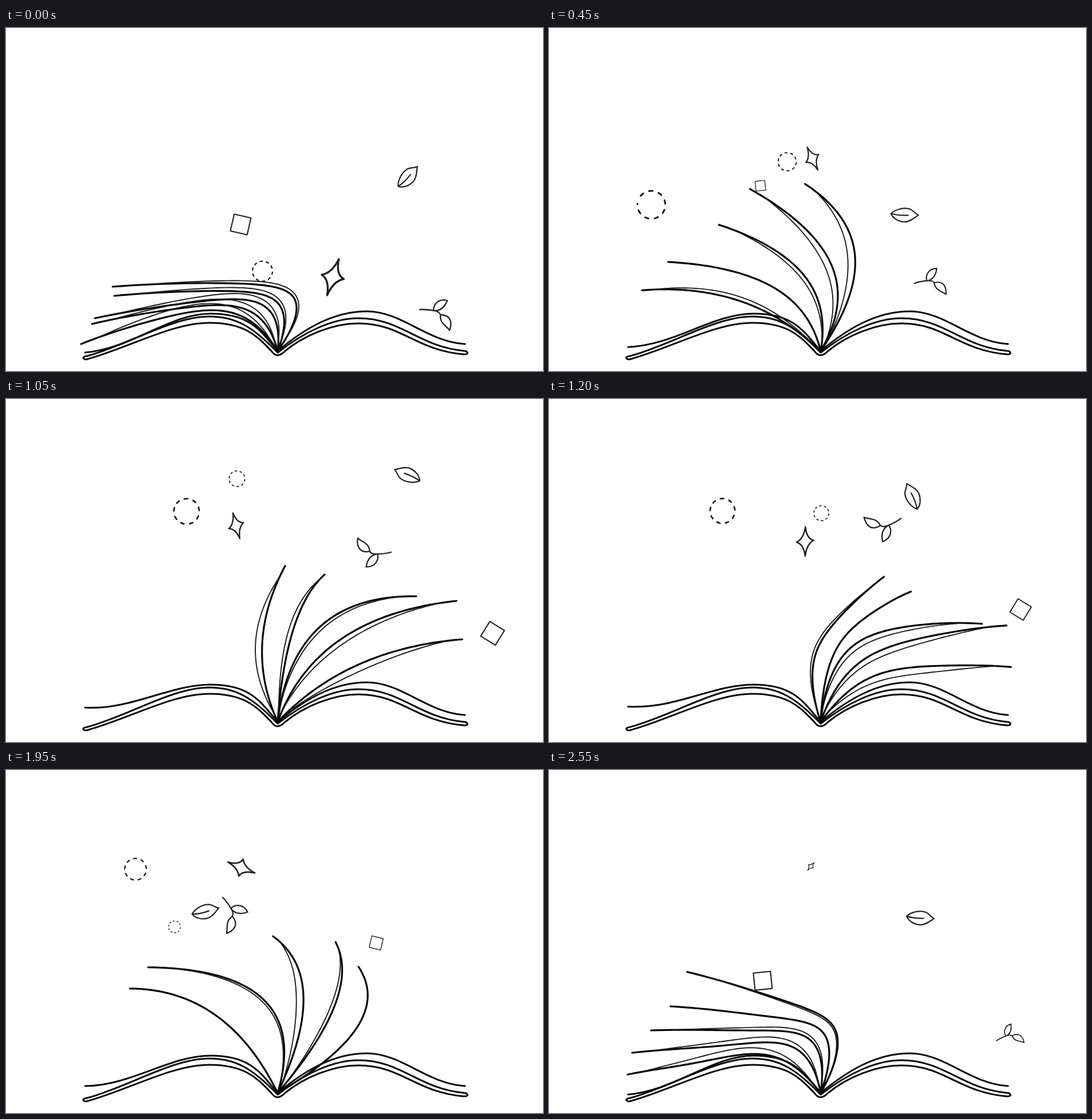
Animation, 937 px wide and 598 px high, one loop 2.7 s. Source, as an HTML page with a canvas:

```html
<!DOCTYPE html>
<html lang="en">
<head>
<meta charset="utf-8">
<title>Open book</title>
<style>
html, body { margin: 0; width: 100%; height: 100%; overflow: hidden; background: #fff; }
canvas { display: block; width: 937px; height: 598px; }
</style>
</head>
<body>
<canvas id="stage" width="937" height="598"></canvas>
<script>
const STEP = 150, STEPS = 18;
const KEYS = [0, 2, 5, 7, 10, 13, 17]; // steps at which poses are set
const SPINE = [474, 563];
const ctx = document.getElementById('stage').getContext('2d');
ctx.lineCap = ctx.lineJoin = 'round';

// ---- motion ----
// Smooth cyclic curve through one value per key
function at(vals, step) {
  const n = KEYS.length;
  const val = j => vals[(j + n) % n];
  const when = j => KEYS[(j + n) % n] + Math.floor(j / n) * STEPS;
  const slope = j => (val(j + 1) - val(j - 1)) / (when(j + 1) - when(j - 1));
  const i = KEYS.findLastIndex(k => k <= step);
  const h = when(i + 1) - when(i), u = (step - when(i)) / h, v = 1 - u;
  return val(i) * (1 + 2 * u) * v * v + val(i + 1) * u * u * (3 - 2 * u)
    + h * u * v * (slope(i) * v - slope(i + 1) * u);
}

const points = (...flat) => KEYS.map((_, i) => flat.slice(2 * i, 2 * i + 2));
const glide = (pts, step) => [0, 1].map(k => at(pts.map(p => p[k]), step));

const lean = ([x, y]) => Math.atan2(x - SPINE[0], SPINE[1] - y);
const reach = ([x, y]) => Math.hypot(x - SPINE[0], y - SPINE[1]);

// Like glide, but turning round the spine
function swing(pts, step) {
  const a = at(pts.map(lean), step), r = at(pts.map(reach), step);
  return [SPINE[0] + r * Math.sin(a), SPINE[1] - r * Math.cos(a)];
}

function pen(width, color) {
  ctx.lineWidth = width;
  ctx.strokeStyle = color;
}

// ---- cover and resting pages ----
const cover = new Path2D('M143 577C215 557 290 514 355 514S440 540 463 563Q473 578 487 563' +
  'C520 536 570 515 615 515C690 515 715 562 799 569Q806 569 805 566Q804 563 800 563' +
  'C720 556 690 506 615 506C570 506 520 530 474 566C430 520 400 503 355 503' +
  'C290 503 215 552 141 572Q134 573 135 576Q138 579 143 577Z');
const restRight = new Path2D('M801 551C735 547 690 494 630 494S520 525 474 563');

function drawBase(step) {
  const sink = Math.cos(2 * Math.PI * (step + .5) / STEPS);
  pen(3, '#0a0a0a');
  ctx.stroke(cover);
  ctx.stroke(restRight);
  ctx.stroke(new Path2D(`M138 ${551 + 15 * sink}C220 ${550 + 9 * sink} 285 498 357 498S445 530 474 563`));
}

// ---- turning pages ----
// Tips of the five pages, and the middles of the first, third and last
const tips = [
  points(186, 451, 350, 305, 649, 297, 796, 419, 780, 493, 615, 343, 241, 352),
  points(189, 467, 257, 332, 568, 283, 786, 352, 750, 415, 575, 300, 212, 412),
  points(155, 506, 239, 388, 446, 289, 716, 344, 748, 405, 466, 290, 178, 454),
  points(150, 516, 179, 440, 299, 342, 556, 306, 686, 355, 248, 344, 145, 493),
  points(131, 551, 149, 485, 219, 380, 487, 291, 673, 341, 216, 381, 137, 531)
];
const middles = [
  points(470, 452, 511, 395, 573, 420, 615, 463, 605, 470, 613, 448, 475, 428),
  points(405, 473, 430, 436, 474, 422, 548, 397, 545, 447, 519, 395, 415, 456),
  points(340, 493, 320, 491, 370, 437, 447, 428, 500, 418, 365, 427, 330, 497)
];
const ripples = [7, 2, 0, 0, 20, 0, 12];

function drawPage(i, step) {
  const t = i / 4;
  const share = [(2 * t - 1) * (t - 1), 4 * t * (1 - t), t * (2 * t - 1)];
  const mids = middles.map(m => swing(m, step));
  const tip = swing(tips[i], step), ripple = at(ripples, step);
  const bend = [0, 1].map(k =>
    2 * mids.reduce((sum, m, j) => sum + m[k] * share[j], 0) - (tip[k] + SPINE[k]) / 2);

  const spot = u => [0, 1].map(k => (1 - u) ** 2 * tip[k] + 2 * u * (1 - u) * bend[k] + u * u * SPINE[k]
    + k * ripple * Math.sin(2 * Math.PI * u));

  const edge = (from, to, bulge) => {
    ctx.beginPath();
    for (let n = 0; n <= 50; n++) {
      const u = from + (to - from) * n / 50;
      const [x, y] = spot(u), [x2, y2] = spot(u + .001);
      const k = bulge * Math.sin(Math.PI * n / 50) / Math.hypot(x2 - x, y2 - y);
      ctx.lineTo(x - (y2 - y) * k, y + (x2 - x) * k);
    }
    ctx.stroke();
  };

  pen(3.2, '#050505');
  edge(0, 1, 0);
  // The far edge shows on one side while the page stands and on the other when it lies
  const bulge = 13 * Math.cos(2 * lean(tip) + .35);
  if (Math.abs(bulge) < 3) return;
  pen(1.9, '#1a1a1a');
  edge(.06, .95, bulge);
}

// ---- floating shapes ----
const shapes = [
  { // leaf
    path: new Path2D('M-24 0C-16 -9 -2 -12 8 -10C15 -8 18 -2 24 0C18 4 10 13 0 13S-20 8 -24 0Q-10 3 6 1'),
    width: 2.2,
    place: points(701, 259, 568, 324, 770, 286, 700, 133, 489, 290, 348, 246, 648, 257),
    turn: [-46, 13, -52, -156, 12, -13, 5],
    size: KEYS.map(() => 1)
  },
  { // star
    path: new Path2D('M0 -33Q3 -6 19 -3Q3 6 0 33Q-4 6 -20 2Q-4 -6 0 -33Z'),
    width: 3.4,
    place: points(570.5, 434.5, 510, 282, 367.5, 157, 402, 221, 524, 278, 410.5, 170, 457, 168),
    turn: [18, -28, -6, -15, 26, -68, 40],
    size: [1, .69, .7, .7, .9, .77, .27]
  },
  { // sprig, placed by the end of its stem
    path: new Path2D('M0 0C10 -1 20 1 26 2Q35 4 36 9M24 2C23 -9 33 -20 48 -16C44 -6 38 2 26 2' +
      'M36 9C35 24 44 26 52 36C57 22 54 9 36 9'),
    width: 2.3,
    place: points(722, 491, 567, 469, 823, 380, 672, 267, 513, 122, 378, 222, 781, 472),
    turn: [0, -57, 106, 168, 79, 49, -31],
    size: [1, 1, .78, 1, 1, 1, .76]
  },
  { // square
    path: new Path2D('M-15 -15h30v30h-30z'),
    width: 2.1,
    place: points(409.5, 342.5, 266, 233.5, 672.5, 403, 849, 408.5, 707.5, 276.5, 646, 301.5, 373, 367.5),
    turn: [13, -9, 10, 32, 23, 13, -6],
    size: [1, .45, 1, 1, .7, .68, 1]
  }
];

function drawShape({ path, width, place, turn, size }, step) {
  const scale = at(size, step);
  ctx.save();
  ctx.translate(...glide(place, step));
  ctx.rotate(at(turn, step) * Math.PI / 180);
  ctx.scale(scale, scale);
  pen(Math.max(1.3, width * scale) / scale, '#222');
  ctx.stroke(path);
  ctx.restore();
}

// ---- dashed circles ----
// They shrink slowly and are gone for the last steps of the loop.
const rings = [
  { dashes: 9, radius: 26, growth: .3, // drawn on over the first steps
    place: points(100, 400, 187, 335.5, 157, 256, 315, 196, 230, 206.5, 226, 173, 150, 300) },
  { dashes: 10, radius: 17.5, growth: 1,
    place: points(447.5, 424, 491, 189.5, 252, 368.5, 403, 139, 560, 384.5, 294, 273.5, 440, 430) }
];

function drawRing({ dashes, radius, growth, place }, step) {
  const r = radius - .55 * step;
  const part = growth < 1 ? Math.min(1, growth * step) : 1;
  if (step > 15 || !part) return;
  const start = -2.44, gap = 2 * Math.PI * r / dashes;
  pen(Math.max(1.3, r * .125), '#1a1a1a');
  ctx.setLineDash([gap * .36, gap * .64]);
  ctx.beginPath();
  ctx.arc(...glide(place, step), r, start, start + 6.28 * part);
  ctx.stroke();
  ctx.setLineDash([]);
}

// ---- loop ----
function draw() {
  const step = Math.floor(performance.now() / STEP) % STEPS;
  ctx.fillStyle = '#fff';
  ctx.fillRect(0, 0, 937, 598);
  drawBase(step);
  tips.forEach((_, i) => drawPage(i, step));
  shapes.forEach(s => drawShape(s, step));
  rings.forEach(r => drawRing(r, step));
  requestAnimationFrame(draw);
}
draw();
</script>
</body>
</html>
```
